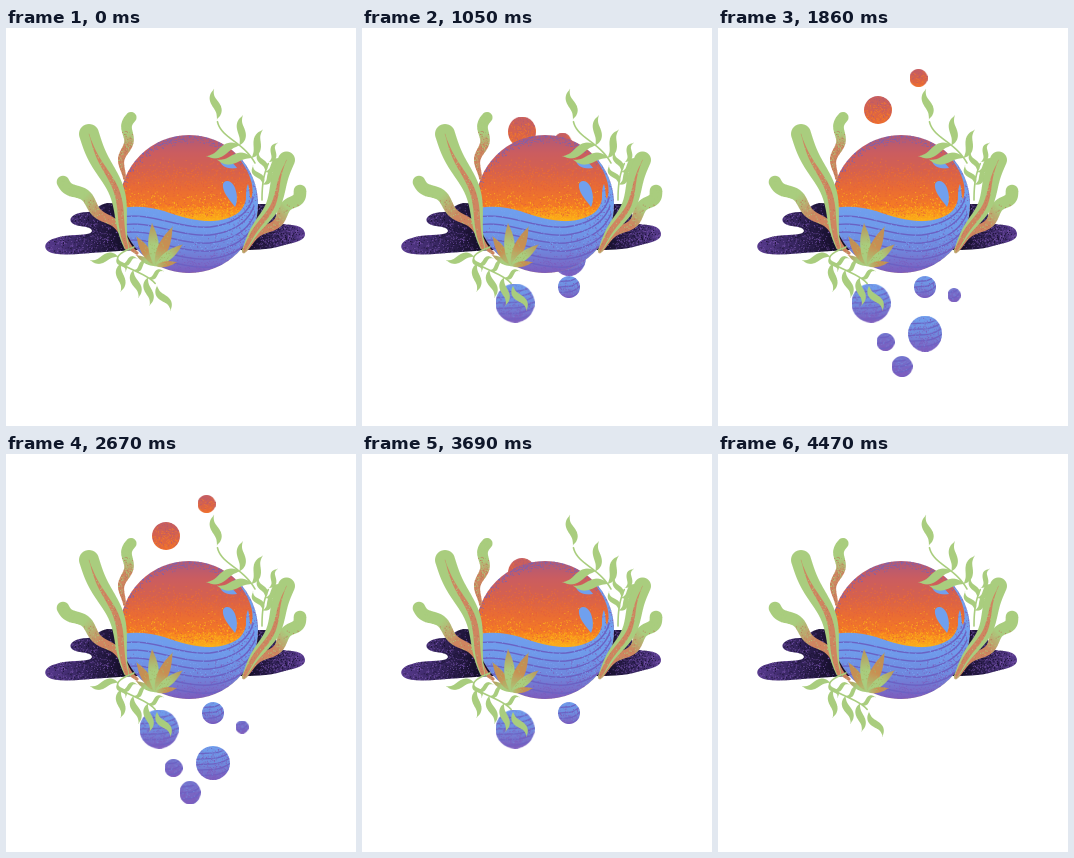
An HTML page with a canvas that plays this animation: 350x398 px, repeating every 4500 ms.

```html
<!DOCTYPE html>
<html lang="en">
<head>
<meta charset="utf-8">
<title>Bubbling orb</title>
<style>
html, body { margin: 0; width: 100%; height: 100%; overflow: hidden; background: #fff; }
canvas { display: block; width: 350px; height: 398px; }
</style>
</head>
<body>
<canvas id="stage"></canvas>
<script>
const W = 350, H = 398, LOOP = 4500, K = 2;
const GREEN = '#a9cd7e', CLAY = '#cf8560', BLUE = '#70a0ee', VIOLET = '#7c5cbd', STRIPE = '#6a62c4';
const ORB = { x: 183, y: 176, r: 69 };
const { PI, sin, cos, hypot, abs, max, min, sign, sqrt } = Math;

let seed = 7;
const rnd = () => (seed = (seed * 16807) % 2147483647) / 2147483647;

function layer(w, h, draw) {
  const c = document.createElement('canvas');
  c.width = w * K;
  c.height = h * K;
  const g = c.getContext('2d');
  g.scale(K, K);
  draw(g);
  return c;
}

function clipped(g, path, draw) {
  g.save();
  g.clip(path);
  draw();
  g.restore();
}

// Stipple a box; density(u, v) gives the chance for each dot.
function grain(g, color, n, [x, y, w, h], density) {
  g.fillStyle = color;
  for (let i = 0; i < n; i++) {
    const u = rnd(), v = rnd();
    if (rnd() < density(u, v)) g.fillRect(x + u * w, y + v * h, 0.9, 0.9);
  }
}

// Linear gradient with evenly spaced colours.
function ramp(g, x0, y0, x1, y1, ...colors) {
  const r = g.createLinearGradient(x0, y0, x1, y1);
  colors.forEach((c, i) => r.addColorStop(i / (colors.length - 1), c));
  return r;
}

function disc(x, y, r) {
  const p = new Path2D();
  p.arc(x, y, r, 0, 7);
  return p;
}

function line(g, path, color, width) {
  g.strokeStyle = color;
  g.lineWidth = width;
  g.lineCap = 'round';
  g.stroke(path);
}

// Bezier of any degree.
function bezier(pts, t) {
  if (pts.length === 1) return pts[0];
  return bezier(pts.slice(1).map(([x, y], i) => [pts[i][0] + (x - pts[i][0]) * t, pts[i][1] + (y - pts[i][1]) * t]), t);
}

// Band along a curve that sways sideways, with its radius given by t.
function ribbon(pts, amp, waves, radius) {
  const p = new Path2D(), [ax, ay] = pts[0], [bx, by] = pts[pts.length - 1];
  const len = hypot(bx - ax, by - ay), steps = Math.ceil(len * 1.6);
  for (let i = 0; i <= steps; i++) {
    const t = i / steps, sway = amp * sin(2 * PI * waves * t), r = max(0.3, radius(t));
    const [cx, cy] = bezier(pts, t);
    const x = cx - (by - ay) / len * sway, y = cy + (bx - ax) / len * sway;
    p.moveTo(x + r, y);
    p.arc(x, y, r, 0, 7);
  }
  return p;
}

// Seaweed from tip to root: clay grain rises from the root, or fills a centre vein.
function weed(g, pts, width, amp, waves, veined) {
  const tip = pts[0], root = pts[pts.length - 1];
  const taper = t => width * (1 - 0.75 * t * t);
  const body = ribbon(pts, amp, waves, taper);
  const box = [min(tip[0], root[0]) - 12, tip[1] - 12, abs(root[0] - tip[0]) + 24, root[1] - tip[1] + 24];
  g.fillStyle = veined ? GREEN : ramp(g, ...tip, ...root, GREEN, GREEN, CLAY, CLAY, CLAY);
  g.fill(body);
  const core = veined ? ribbon(pts, amp, waves, t => taper(t) * 0.7 * t) : body;
  if (veined) {
    g.fillStyle = CLAY;
    g.fill(core);
  }
  clipped(g, core, () => {
    grain(g, '#bd7a58', 2200, box, (u, v) => v > 0.3 ? 0.25 : 0);
    grain(g, GREEN, 2200, box, (u, v) => 0.5 * (1 - v));
  });
}

function leaf(x, y, angle, len, sway = 2.2) {
  const end = [x + len * cos(angle), y + len * sin(angle)];
  return ribbon([[x, y], end], sway, 1, t => len * 0.125 * sin(PI * t ** 0.9));
}

// Stem with pairs of leaves and one more at its end; ratio sizes the left of each pair.
function vine(g, pts, { pairs, from, step, len, lean, ratio = 1 }) {
  line(g, ribbonLine(pts), GREEN, 1.6);
  g.fillStyle = GREEN;
  const heading = t => {
    const [a, b] = [bezier(pts, t - 0.01), bezier(pts, t + 0.01)];
    return Math.atan2(b[1] - a[1], b[0] - a[0]);
  };
  for (let i = 0; i < pairs; i++) {
    const t = from + i * step, [x, y] = bezier(pts, t);
    g.fill(leaf(x, y, heading(t) + lean, len));
    g.fill(leaf(x, y, heading(t) - lean, len * ratio));
  }
  g.fill(leaf(...bezier(pts, 1), heading(1), len, 2.5));
}

function ribbonLine(pts) {
  const p = new Path2D();
  for (let t = 0; t <= 1; t += 0.05) p.lineTo(...bezier(pts, t));
  return p;
}

function shadow(g, d, box, inner, outer) {
  const p = new Path2D(d), fromOuter = u => outer < inner ? u : 1 - u;
  g.fillStyle = ramp(g, outer, 0, inner, 0, '#56398c', '#36255f', '#160f2b');
  g.fill(p);
  clipped(g, p, () => {
    grain(g, '#7350a6', 2800, box, u => 0.5 - 0.45 * fromOuter(u));
    grain(g, '#1a1232', 2400, box, u => 0.15 + 0.35 * fromOuter(u));
  });
}

const back = layer(W, H, g => {
  shadow(g, `M126 176 L101 175 C89 178 91 183 82 184 C69 184 61 190 66 195 C72 200 85 197 86 203
    C84 209 64 205 50 210 C37 213 36 222 46 225 C62 229 80 224 134 222Z`, [38, 174, 90, 54], 115, 40);
  shadow(g, `M246 176 L262 176 C275 185 268 190 272 195 C282 198 298 195 299 206
    C299 214 284 215 275 218 C262 222 246 222 230 222Z`, [228, 174, 72, 50], 245, 299);
});

function paintOrb(g) {
  const { x, y, r } = ORB, top = y - r, box = [x - r, top, 2 * r, 2 * r];
  const rim = (u, v) => hypot(u - 0.5, v - 0.5) * 2;
  clipped(g, disc(x, y, r), () => {
    g.fillStyle = ramp(g, 0, top, 0, 196, '#b05a78', '#cb5d60', '#d5614f', '#e86b36', '#f67d22', '#fdb916');
    g.fillRect(...box);
    grain(g, '#7461b8', 9000, box, (u, v) => max(0, 1 - 7 * (1 - rim(u, v)) - v * 1.6));
    grain(g, '#ee7030', 4500, [x - r, 128, 2 * r, 50], (u, v) => v * 0.6);
    grain(g, '#fdb71a', 5000, [x - r, 150, 2 * r, 48], (u, v) => v * v * 0.6);
    grain(g, '#e5603a', 2500, [x - r, 140, 2 * r, 48], () => 0.2);

    const water = new Path2D(`M110 182 C122 177 142 178 158 183 C180 191 204 197 222 190
      C234 186 238 180 240 171 C240 165 240 160 242 156 C244 162 243 168 245 171
      C249 160 245 146 233 130 L262 130 L262 250 L108 250Z`);
    g.fillStyle = ramp(g, 0, 178, 0, 245, BLUE, '#6f9aea', '#7086dc', VIOLET);
    g.fill(water);
    clipped(g, water, () => {
      for (let i = 0; i < 6; i++) {
        const o = 190 + i * 8;
        line(g, new Path2D(`M112 ${o} C142 ${o - 8} 170 ${o + 11} 204 ${o + 9}
          C228 ${o + 6} 242 ${o - 4} ${247 + i} ${o - 20}`), STRIPE, 1.4);
      }
      grain(g, VIOLET, 6500, box, (u, v) => max(0, hypot(u - 0.4, v - 0.4) * 2.5 - 1));
      grain(g, '#78a2f0', 1500, [114, 178, 120, 45], () => 0.2);
    });
    g.fillStyle = BLUE;
    g.fill(new Path2D('M214 133 C220 130 227 134 231 140 C224 141 216 140 214 133Z'));
    g.fill(new Path2D('M217 156 C219 151 226 152 229 160 C232 168 231 175 229 179 C225 173 216 165 217 156Z'));
  });
}

function paintPlants(g) {
  weed(g, [[125, 89.5], [119, 115], [116, 150]], 5.5, 2.6, 1.7);
  weed(g, [[57, 154], [88, 174], [132, 224]], 6.3, 2.6, 2.4);
  weed(g, [[83, 106], [112, 160], [122, 219]], 10, 2.5, 1.4, true);
  weed(g, [[294, 163], [282, 186], [236, 222]], 6.3, -2.6, 2.2);
  weed(g, [[280.5, 132], [269, 182], [237, 222]], 8.5, 1.8, 1.6, true);

  vine(g, [[256, 172], [256, 155], [258, 145], [263, 134]], { pairs: 2, from: 0.35, step: 0.35, len: 21, lean: 0.6 });
  vine(g, [[249, 135], [236, 112], [213, 110], [211, 91]], { pairs: 2, from: 0.08, step: 0.26, len: 30, lean: 1, ratio: 1.15 });
  vine(g, [[128, 219], [84, 236], [141, 240], [151, 258]], { pairs: 4, from: 0.22, step: 0.2, len: 28, lean: 0.95, ratio: 0.6 });

  for (let i = 0; i < 6; i++) {
    const angle = (i * 28 - 150) * PI / 180, len = 22 + 22 * sin(i / 5 * PI);
    const p = leaf(149, 238, angle, len, 0);
    g.fillStyle = ramp(g, 149, 238, 149 + len * cos(angle), 238 + len * sin(angle), GREEN, i % 2 ? '#c98f52' : GREEN, '#bd9058');
    g.fill(p);
    clipped(g, p, () => grain(g, '#a6b867', 500, [124, 194, 44, 46], () => 0.3));
  }
}

const front = layer(W, H, g => {
  paintOrb(g);
  paintPlants(g);
});

function bubbleSprite(r, warm) {
  const s = 2 * r, box = [0, 0, s, s];
  return layer(s, s, g => clipped(g, disc(r, r, r), () => {
    g.fillStyle = warm ? ramp(g, 0, 0, 0, s, '#c65e62', '#d6614c', '#ec6b30')
      : r < 11 ? ramp(g, 0, 0, 0, s, '#7474cd', VIOLET)
      : ramp(g, 0, 0, 0, s, BLUE, '#6f8ddf', VIOLET);
    g.fillRect(...box);
    for (let y = r * 0.35; y < s * 1.2 && !warm; y += 5.5) {
      line(g, new Path2D(`M0 ${y + 2} C${r * 0.7} ${y} ${r * 1.2} ${y + 4} ${s} ${y - 5}`), STRIPE, 1.3);
    }
    grain(g, warm ? '#f0792e' : VIOLET, s * s, box, (u, v) => v * 0.4);
    grain(g, warm ? '#b45b70' : '#7484d8', s * s, box, (u, v) => (1 - v) * 0.25);
  }));
}

// rest: height once out; out and back: start and length of each trip; over: overshoot.
const bubbles = [
  { x: 160, r: 14, rest: 82, out: [540, 1000], back: [2970, 1000] },
  { x: 200.5, r: 9, rest: 50, out: [945, 620], back: [2900, 610] },
  { x: 153, r: 19.5, rest: 275, out: [150, 800], back: [3700, 750] },
  { x: 207, r: 11, rest: 259, out: [450, 550], back: [3880, 570] },
  { x: 207, r: 17, rest: 309, out: [810, 1200], back: [2760, 750] },
  { x: 167.5, r: 9, rest: 314, out: [1150, 410], back: [2900, 460] },
  { x: 184, r: 10.5, rest: 338.5, out: [1225, 625], back: [2670, 735], over: 0.4 },
  { x: 236, r: 6.5, rest: 273, out: [1255, 750], back: [2750, 500] }
];
for (const b of bubbles) {
  const side = sign(b.rest - ORB.y);
  b.home = ORB.y + side * sqrt((ORB.r - b.r - 1) ** 2 - (b.x - ORB.x) ** 2);
  b.sprite = bubbleSprite(b.r, side < 0);
}

const ease = (u, over) => (1 - cos(PI * u)) / 2 + over * u * u * sin(PI * u);
const progress = (t, [start, length]) => max(0, min(1, (t - start) / length));

function height({ home, rest, out, back, over = 0 }, t) {
  const u = t < back[0] ? progress(t, out) : 1 - progress(t, back);
  return home + (rest - home) * ease(u, over);
}

const stage = document.getElementById('stage'), ctx = stage.getContext('2d');
const dpr = window.devicePixelRatio || 1;
stage.width = W * dpr;
stage.height = H * dpr;
ctx.scale(dpr, dpr);
ctx.imageSmoothingQuality = 'high';

function draw(t) {
  ctx.fillStyle = '#fff';
  ctx.fillRect(0, 0, W, H);
  ctx.drawImage(back, 0, 0, W, H);
  for (const b of bubbles) {
    const y = height(b, t), speed = abs(height(b, t + 8) - height(b, t - 8)) / 16;
    const ry = b.r * (1 + min(0.2, speed * 1.3));
    ctx.drawImage(b.sprite, b.x - b.r, y - ry, 2 * b.r, 2 * ry);
  }
  ctx.drawImage(front, 0, 0, W, H);
}

const start = performance.now();
function tick() {
  draw((performance.now() - start) % LOOP);
  requestAnimationFrame(tick);
}
tick();
</script>
</body>
</html>
```
